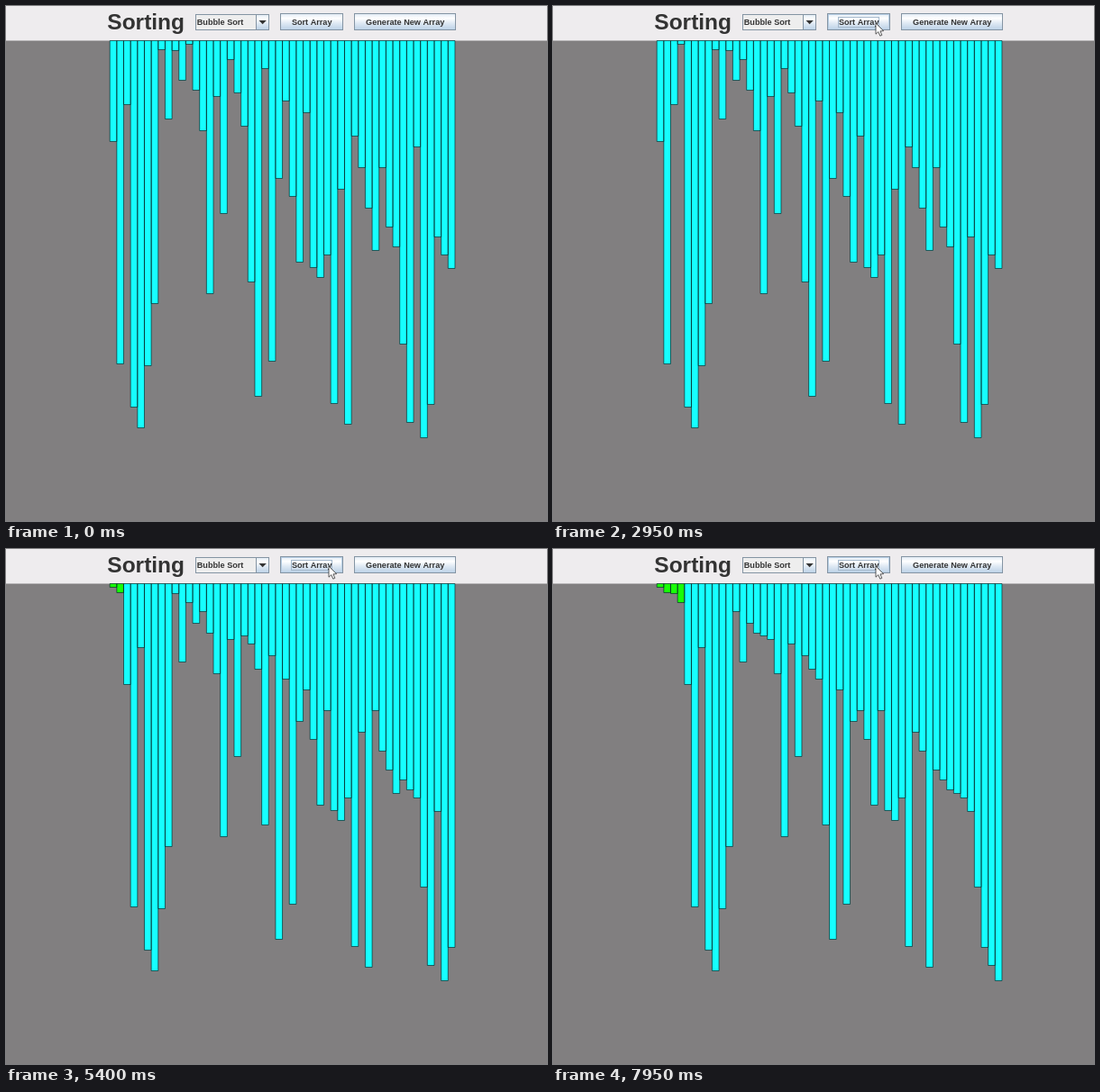
These frames come from a looping animation (600 by 572 pixels, 8000 ms). An HTML page with a canvas:

```html
<!DOCTYPE html>
<html lang="en">
<head>
<meta charset="utf-8">
<title>Sorting</title>
<style>
html, body { margin: 0; width: 100%; height: 100%; overflow: hidden; background: #817f80; }
canvas { display: block; }
</style>
</head>
<body>
<canvas id="stage" width="600" height="572"></canvas>
<script>
const ctx = document.getElementById('stage').getContext('2d');

const LOOP = 8000, TICK = 50;
const PRESS = 1400, SORT_START = 1486, STEP = 31.3;
const BAR_X = 115.2, BAR_W = 7.655, TOP = 38.5;
const BTN_Y = 8, BTN_H = 19;
const FONT = '"Liberation Sans", Arial, sans-serif';

// the unsorted input: bar heights in pixels
const INPUT = [
  112, 359, 71, 407, 430, 361, 292, 10, 87, 11, 44, 4, 55, 100, 281, 62, 192,
  21, 58, 95, 268, 395, 31, 356, 153, 67, 173, 246, 80, 252, 263, 238, 403,
  165, 426, 106, 141, 186, 233, 141, 207, 229, 337, 424, 118, 441, 404, 218,
  238, 253
];

const ARROW = new Path2D('M0 0V12.2L2.8 9.7L4.8 14.2L6.8 13.3L4.9 8.9L8.6 8.7Z');

// Bubble sort from the right; each finished pass takes one extra step.
function sortAfter(steps) {
  const bars = INPUT.slice();
  let done = 0;
  while (done < bars.length - 1) {
    for (let j = bars.length - 1; j > done; j--) {
      if (steps-- <= 0) return { bars, done };
      if (bars[j] < bars[j - 1]) [bars[j], bars[j - 1]] = [bars[j - 1], bars[j]];
    }
    if (steps-- <= 0) return { bars, done };
    done++;
  }
  return { bars, done };
}

// The pointer glides in a straight line to the sort button.
function pointerAt(t) {
  if (t < 600) return null;
  const k = Math.min(1, (t - 600) / 700);
  return { x: 478 - 120 * k, y: 9 + 10 * k };
}

function text(str, x, y, size, align = 'left') {
  ctx.font = `bold ${size}px ${FONT}`;
  ctx.textAlign = align;
  ctx.fillStyle = '#333';
  ctx.fillText(str, x, y);
}

function frame(x, y, w, h, color) {
  ctx.strokeStyle = color;
  ctx.lineWidth = 1;
  ctx.strokeRect(x + 0.5, y + 0.5, w - 1, h - 1);
}

function gloss(x, y, w, h) {
  const g = ctx.createLinearGradient(0, y, 0, y + h);
  g.addColorStop(0, '#dde8f3');
  g.addColorStop(0.3, '#fff');
  g.addColorStop(0.6, '#dde8f3');
  g.addColorStop(1, '#b8cfe5');
  ctx.fillStyle = g;
  ctx.fillRect(x, y, w, h);
}

function button(label, x, w, pointer, focused, pressed) {
  const hover = pointer && pointer.x >= x && pointer.x < x + w;
  const mid = x + w / 2 + 0.2;
  gloss(x, BTN_Y, w, BTN_H);
  if (pressed) {
    ctx.fillStyle = '#b8cfe5';
    ctx.fillRect(x, BTN_Y, w, BTN_H);
  }
  if (hover) frame(x + 1, BTN_Y + 1, w - 2, BTN_H - 2, '#b8cfe5');
  frame(x, BTN_Y, w, BTN_H, '#8494a3');
  if (focused) frame(Math.round(mid - 23), 12, 46, 12, '#a3b8cc');
  text(label, mid, 21, 9.15, 'center');
}

function combo(label) {
  ctx.fillStyle = '#eee';
  ctx.fillRect(210, 9, 82, 18);
  gloss(277, 9, 15, 18);
  frame(210, 9, 82, 18, '#8494a3');
  ctx.fillStyle = '#8494a3';
  ctx.fillRect(277, 9, 1, 18);
  text(label, 211.8, 21, 9.1);
  ctx.beginPath();
  ctx.moveTo(280.5, 16);
  ctx.lineTo(288.8, 16);
  ctx.lineTo(284.6, 20.3);
  ctx.fill();
}

function drawPointer({ x, y }) {
  ctx.save();
  ctx.translate(x, y);
  ctx.fillStyle = '#fff';
  ctx.fill(ARROW);
  ctx.strokeStyle = '#333';
  ctx.lineWidth = 0.8;
  ctx.stroke(ARROW);
  ctx.restore();
}

// All outlines share one path, so common edges are not darkened twice.
function drawBars({ bars, done }) {
  ctx.beginPath();
  bars.forEach((h, i) => {
    const x = BAR_X + i * BAR_W;
    ctx.fillStyle = i < done ? '#18ff08' : '#16ffff';
    ctx.fillRect(x, TOP, BAR_W, h);
    ctx.rect(x, TOP, BAR_W, h);
  });
  ctx.strokeStyle = 'rgba(0, 40, 40, 0.72)';
  ctx.lineWidth = 0.9;
  ctx.stroke();
}

function draw(t) {
  const pointer = pointerAt(t);
  ctx.fillStyle = '#817f80';
  ctx.fillRect(0, 0, 600, 572);
  ctx.fillStyle = '#eeecee';
  ctx.fillRect(0, 0, 600, TOP);

  text('Sorting', 112.3, 26, 24.5);
  combo('Bubble Sort');
  button('Sort Array', 304, 70, pointer, t >= PRESS, t >= PRESS && t < SORT_START);
  button('Generate New Array', 386, 113, pointer, false, false);
  drawBars(sortAfter(Math.floor((t - SORT_START) / STEP)));
  if (pointer) drawPointer(pointer);
}

const begin = performance.now();
function run() {
  const t = Math.max(0, performance.now() - begin) % LOOP;
  draw(Math.floor(t / TICK) * TICK);
  requestAnimationFrame(run);
}
run();
</script>
</body>
</html>
```
